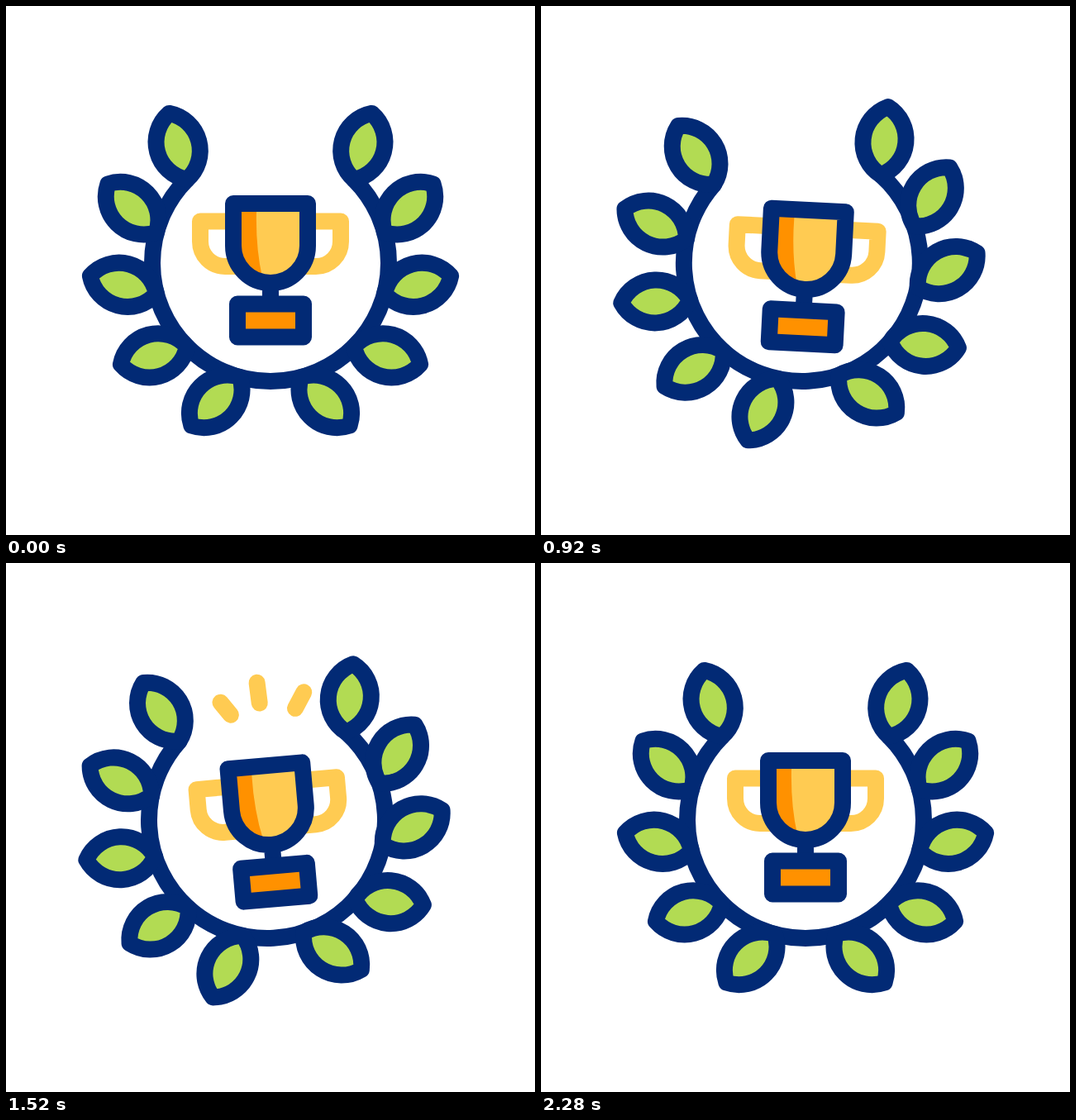
Recreate the animation shown at these times as an HTML page. Size 640 px wide and 640 px high, loop 2400 ms.

```html
<!DOCTYPE html>
<html lang="en">
<head>
<meta charset="utf-8">
<title>Trophy in a laurel wreath</title>
<style>
html, body { margin: 0; width: 100%; height: 100%; overflow: hidden; background: #fff; }
svg { display: block; width: 100vw; height: 100vh; }
.line { stroke: #022a75; stroke-width: 20; stroke-linejoin: round; stroke-linecap: round; }
.gold { fill: none; stroke: #ffcb52; stroke-width: 20; stroke-linejoin: round; stroke-linecap: round; }
</style>
</head>
<body>
<svg viewBox="0 0 640 640">
  <defs>
    <clipPath id="bowl"><path d="M275 239H365V290a45 45 0 0 1-90 0Z"/></clipPath>
  </defs>
  <g id="wreath">
    <path class="line" fill="none" d="M-101.1-101.1A143 143 0 1 0 101.1-101.1"/>
  </g>
  <g id="trophy">
    <path class="gold" d="M275 260.5H235V285a30 30 0 0 0 30 30H285M365 260.5H405V285a30 30 0 0 1-30 30H355"/>
    <g clip-path="url(#bowl)">
      <path fill="#ffcb52" d="M270 230H370V340H270Z"/>
      <path fill="#ff9100" d="M270 230H303V249Q302 292 310 328V340H270Z"/>
    </g>
    <path class="line" fill="none" d="M275 239H365V290a45 45 0 0 1-90 0ZM320 340V358"/>
    <path class="line" fill="#ff9100" d="M280 360.5H360V400.5H280Z"/>
  </g>
</svg>
<script>
const LOOP = 2400, STEP = 40, RADIUS = 143;
const wreath = document.getElementById('wreath');
const trophy = document.getElementById('trophy');

// Motion tracks as [time, value] pairs.
const shift = [[200, 0], [400, 5.5], [490, 7], [720, -4], [840, -6.2], [1120, 5.5],
  [1210, 6.5], [1470, -4.6], [1520, -4], [1800, 2.5], [1900, 4], [2110, -2], [2280, 0]];
const sway = [[200, 0], [400, 3], [580, 12], [720, 9], [870, -13], [1120, 3],
  [1280, 10], [1510, -12.2], [1520, -12], [1800, 8], [1880, 9], [2090, -5], [2280, 0]];
const droop = [[200, 0], [400, 1], [1840, 1], [2280, 0]];
const tilt = [[200, 0], [400, -3.4], [560, -5.8], [720, -4.6], [1000, 4.5], [1120, 3.7],
  [1520, -5], [1570, -5.3], [1800, -1.2], [2020, 2.8], [2280, 0]];
const bob = [[200, 0], [320, -2], [400, 0], [740, 17.3], [1120, -5], [1170, -5.6],
  [1520, 6], [1775, 17], [2160, -2.5], [2280, 0]];
const sparkHead = [[1380, 0], [1500, 1]];
const sparkTail = [[1530, 0], [1660, 1]];

// Smooth curve through the keys that never overshoots them.
function sample(keys, t) {
  const last = keys.length - 1;
  if (t <= keys[0][0]) return keys[0][1];
  if (t >= keys[last][0]) return keys[last][1];
  const grade = i => (keys[i + 1][1] - keys[i][1]) / (keys[i + 1][0] - keys[i][0]);
  const slope = i => {
    if (i === 0 || i === last) return 0;
    const a = grade(i - 1), b = grade(i);
    return a * b > 0 ? 2 * a * b / (a + b) : 0;
  };
  let i = 0;
  while (t >= keys[i + 1][0]) i++;
  const span = keys[i + 1][0] - keys[i][0];
  const u = (t - keys[i][0]) / span, v = 1 - u;
  return v * v * (1 + 2 * u) * keys[i][1] + u * u * (3 - 2 * u) * keys[i + 1][1]
    + span * u * v * (v * slope(i) - u * slope(i + 1));
}

function addPath(parent, attrs) {
  const node = document.createElementNS('http://www.w3.org/2000/svg', 'path');
  for (const name in attrs) node.setAttribute(name, attrs[name]);
  return parent.appendChild(node);
}

// Leaves sit every 30 degrees down each side; lean is each leaf's own droop.
const leaves = [];
function addSide(side, leans) {
  leans.forEach((lean, k) => {
    const rise = 45 - 30 * k;
    leaves.push({
      place: side > 0 ? -rise : 180 + rise,
      side,
      lean: 3 * side + lean,
      node: addPath(wreath, {
        class: 'line', fill: '#b2db53', d: 'M0 0A46 46 0 0 1 82.8 0A46 46 0 0 1 0 0Z'
      })
    });
  });
}
addSide(-1, [1.5, -1, 0.5, 2, -1]);
addSide(1, [3, -2, -3, 2, 0]);

// Each spark runs from its inner end to its outer end.
const sparks = [[284, 174, 273, 158], [320, 163, 319, 138], [362.5, 173, 374.5, 154.5]]
  .map(ends => ({ ends, node: addPath(trophy, { class: 'gold' }) }));

function draw(t) {
  const dx = sample(shift, t);
  wreath.setAttribute('transform', `translate(${320 + dx} 311) rotate(${dx / 1.3})`);

  const swing = sample(sway, t), weight = sample(droop, t);
  for (const { place, side, lean, node } of leaves) {
    const turn = -30 * side + swing + weight * lean;
    node.setAttribute('transform', `rotate(${place}) translate(${RADIUS}) rotate(${turn})`);
  }

  trophy.setAttribute('transform',
    `translate(0 ${sample(bob, t)}) rotate(${sample(tilt, t)} 320 315)`);

  const head = sample(sparkHead, t), tail = sample(sparkTail, t);
  for (const { ends: [x1, y1, x2, y2], node } of sparks) {
    const at = f => `${x1 + (x2 - x1) * f} ${y1 + (y2 - y1) * f}`;
    node.setAttribute('d', head > tail ? `M${at(tail)}L${at(head)}` : '');
  }
}

const start = performance.now();
function tick() {
  const t = (performance.now() - start) % LOOP;
  draw(Math.floor(t / STEP) * STEP);
  requestAnimationFrame(tick);
}
tick();
</script>
</body>
</html>
```
